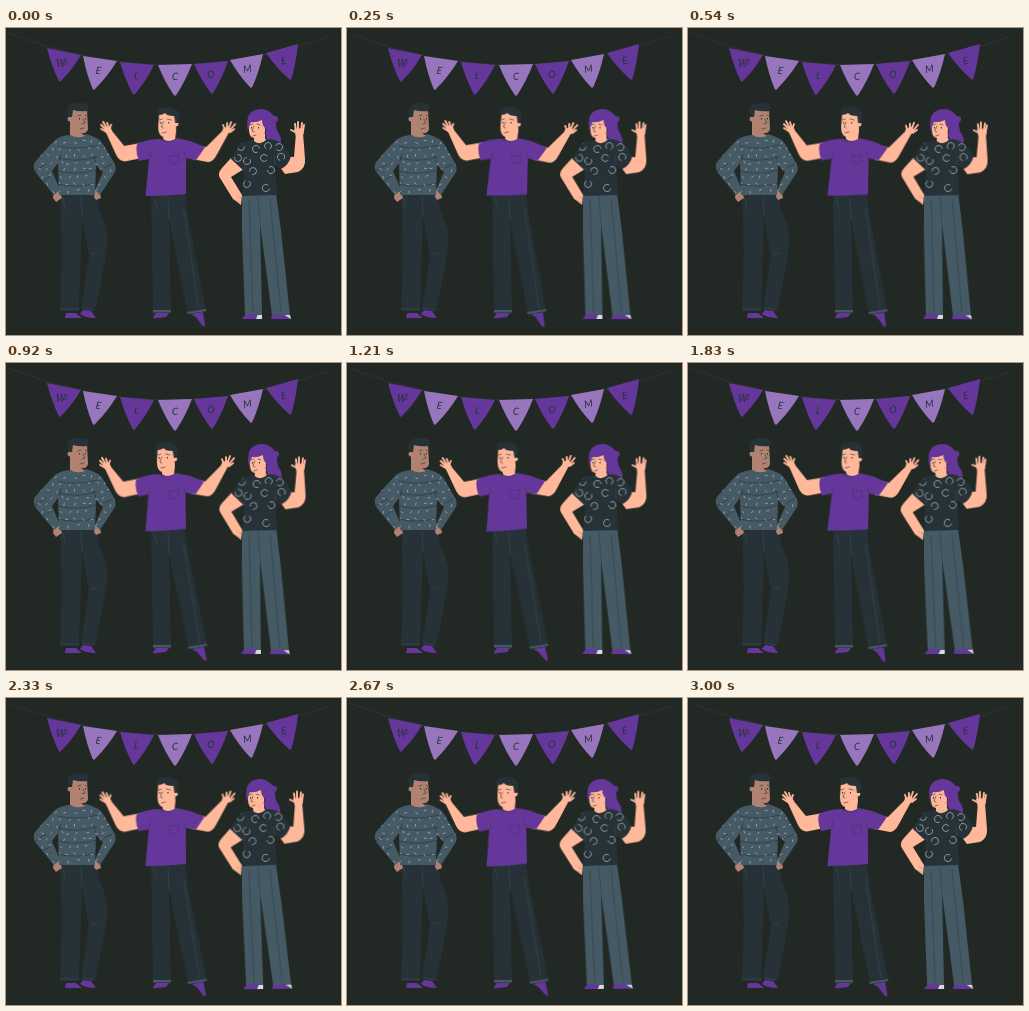
An HTML page for the animation above (3040 ms loop, 335x307 px).

```html
<!DOCTYPE html>
<html lang="en">
<head>
<meta charset="utf-8">
<title>Welcome</title>
<style>
html, body { margin: 0; width: 100%; height: 100%; overflow: hidden; background: #222823; }
svg { display: block; width: 100vw; height: 100vh; }
text { font-family: Lato, sans-serif; font-size: 10px; font-style: italic; fill: #263238; text-anchor: middle; }
.script { font-family: "Noto Serif", serif; font-size: 10px; }
.purple { fill: #66379b; }
.lilac { fill: #9876bd; }
.navy, .hair { fill: #263238; }
.slate { fill: #455a64; }
.brown { fill: #b18272; }
.skin { fill: #ffb899; }
.line { fill: none; stroke: #263238; stroke-width: .6; stroke-linecap: round; stroke-linejoin: round; }
.faint { stroke: #415158; stroke-width: .5; }
.white { fill: none; stroke: #b9c4c8; stroke-width: .65; stroke-linecap: round; }
.finger { fill: none; stroke: #ffb899; stroke-width: 1.9; stroke-linecap: round; }

/* Half a sine per pass; the man sways twice per loop, the woman once. */
.sway, .slow { animation: sway 760ms -410ms infinite alternate cubic-bezier(.37, 0, .63, 1); }
.slow { animation-duration: 1520ms; animation-delay: -760ms; }
@keyframes sway {
  from { transform: rotate(calc(var(--a) * -1)); }
  to { transform: rotate(var(--a)); }
}
#upper { --a: 1.3deg; transform-origin: 162px 168px; }
#armL { --a: -.5deg; transform-origin: 132px 123px; }
#armR { --a: -.5deg; transform-origin: 194px 125px; }
#leg { --a: .6deg; transform-origin: 172px 170px; }
#foot { --a: 2.5deg; transform-origin: 190px 285px; }
#woman { --a: .65deg; transform-origin: 254px 185px; }
</style>
</head>
<body>
<svg viewBox="0 0 335 307" preserveAspectRatio="none">
  <defs>
    <clipPath id="knit"><path d="M63 107Q54 108 49 112Q40 121 29 134Q26 139 30 145L48 167L54 162L46 143L52 135L53 167H89L90 137L97 144L89 162L94 167L109 144Q111 139 107 133L97 116Q94 110 80 106Q72 110 63 107Z"/></clipPath>
    <clipPath id="blouse"><path d="M248 112L237 114Q229 122 225 131L238 143L236 168L271 167L269 137L275 141Q283 137 285 128Q278 115 269 112L260 110Q253 117 248 112Z"/></clipPath>
  </defs>

  <path d="M2 5Q162 68 324 8" fill="none" stroke="#343d38" stroke-width=".6"/>
  <g id="flags"></g>

  <!-- man in the sweater -->
  <g>
    <path class="navy" d="M54 165H90L94 184Q104 204 101 221Q96 252 89 283L75 281L83 228L76 190L73 283H54Q57 220 54 165Z"/>
    <path class="line faint" d="M76 188L75 169M85 226L91 225M55 281H73M77 280L87 282M57 170L59 180"/>
    <path class="purple" d="M60 285H70L76 290H59ZM77 282L85 283L90 290Q79 290 74 286Z"/>
    <path class="brown" d="M48 163L54 164L56 170L50 174L47 170ZM89 162L94 165L95 170L90 172L88 169Z"/>
    <g clip-path="url(#knit)">
      <path class="slate" d="M20 100H120V175H20Z"/>
      <path class="line" d="M52 118Q70 123 92 117M52 130Q70 135 91 129M52 143Q70 148 91 142M52 156Q70 161 91 155M29 143L40 136M98 140L109 135M38 153L46 147M53 133L55 126M90 137L88 128"/>
      <path class="white" id="dashes"/>
    </g>
    <path class="brown" d="M64 81H81L82 101Q81 106 75 105L79 108Q71 111 64 107Z"/>
    <circle class="brown" cx="64" cy="91" r="2.5"/>
    <path class="hair" d="M63 89Q59 81 64 77Q72 73 81 76Q84 79 82 83Q73 84 67 82L66 89Z"/>
    <path class="line" d="M72 88L75 87M79 87L81 88M77 91L79 95L76 96M74 101L78 100"/>
    <path class="navy" d="M73 90h1v1.5h-1zM79 90h1v1.5h-1z"/>
  </g>

  <!-- man with open arms -->
  <g>
    <g id="leg" class="sway">
      <path class="navy" d="M161 165H179L182 190L200 282L182 285L163 191Z"/>
      <path class="line faint" d="M176 170L179 190L193 280M168 171L174 171"/>
      <path class="slate" d="M181 284L200 281L200.500 283L182 286Z"/>
      <path id="foot" class="sway purple" d="M185 286L197 284L199 295Q200 299 197 298L190 289Z"/>
    </g>
    <path class="navy" d="M145 165H179L178 180L163 191L165 284H147Z"/>
    <path class="line faint" d="M163 191L162 170M148 171L151 180"/>
    <path class="slate" d="M147 282H165V284.500H147Z"/>
    <path class="purple" d="M150 285H163L160 289L147 290.500Q147 288 150 285Z"/>
    <g id="upper" class="sway">
      <g id="armL" class="sway">
        <path class="skin" d="M100 105L105 102L118 118L135 115L136 130L119 133.500Q113 133 110 127Z"/>
        <path class="skin" d="M99 100L104 99L106 103L101 106L98 103Z"/>
        <path class="finger" d="M100 102L95 97M101 101L97 94M103 101L101 95M103 102L105 97M100 104L95 101"/>
      </g>
      <g id="armR" class="sway">
        <path class="skin" d="M186 117L200 119L217 102L223 104L211 126Q207 134 202 134L186 131Z"/>
        <path class="skin" d="M217 100L223 98L225 103L221 106L216 104Z"/>
        <path class="finger" d="M219 102L217 97M221 102L221 95M222 102L225 94M223 103L229 96M224 104L228 101"/>
      </g>
      <path class="purple" d="M154 111Q162 114 170 110L184 113L199 119Q195 125 190 132L180 130L180 166Q160 168 139.500 168L143 131L133 133Q129 124 131 116Q142 111 154 111Z"/>
      <path class="line" d="M164 128L173 127V134L170 136L165 135ZM180 130L178 123M144 131L145 123M154 112Q162 116 170 111" stroke-opacity=".6"/>
      <path class="skin" d="M153 85L169 84L170 103L169 111Q162 115 157 111V109Q152 107 152 99Z"/>
      <circle class="skin" cx="170" cy="96" r="2.4"/>
      <path class="hair" d="M153 87Q149 85 152 83Q151 79 157 80Q164 77 169 81Q175 84 172 95L169 95L168 88Q160 88 159 85Q156 87 153 87Z"/>
      <path class="line" d="M153 92L156 91M161 91L165 92M157 94L155 99L157 100M156 105L160 104"/>
      <path class="navy" d="M154 94h1v1.5h-1zM162 94h1v1.5h-1z"/>
    </g>
  </g>

  <!-- waving woman -->
  <g id="woman" class="slow">
    <path class="slate" d="M236 165H270L275 203L284 287H266L254 195L256 287H239L236 203Z"/>
    <path class="line" d="M254 195L252 169M243 172L247 285M264 171L275 284" stroke-opacity=".65"/>
    <path fill="#d8dce0" d="M249 287H256L256 291H247ZM275 287H284L285 291H275Z"/>
    <path class="purple" d="M240 286H252L250 291H236ZM266 287L277 286L285 291H265Z"/>
    <path class="skin" d="M225 130L238 141L225 149L236 167L235 177L227 171L214 150Q211 145 216 140Z"/>
    <path class="line" d="M228 172L235 175M231 169L236 171" stroke-opacity=".3"/>
    <path class="skin" d="M275 128L288 129L290 105L297 105L299 131Q300 140 292 144L279 146L273 138Z"/>
    <path class="skin" d="M288 101L297 100L298 105L296 109H290Z"/>
    <path class="finger" d="M289 104L285 102M290 103L289 96M292 103L292 94M295 103L296 95M297 103L298 97"/>
    <path class="purple" d="M261 92L270 92Q269 101 274 108Q277 115 272 118Q269 115 264 114Q259 108 261 92Z"/>
    <g clip-path="url(#blouse)">
      <path class="navy" d="M220 105H290V172H220Z"/>
      <g id="rings"></g>
    </g>
    <path class="line faint" d="M238 143L239 134M269 137L268 128"/>
    <path class="skin" d="M243 92L259 88V110L260 112Q254 118 248 113V110Q243 109 243 102Z"/>
    <path class="purple" d="M242 104Q239 87 247 83Q257 78 265 85L270 90L268 98L263 112Q258 110 260 101Q256 98 256 92Q250 95 245 94Q243 98 242 104Z"/>
    <ellipse class="purple" cx="269" cy="91" rx="3" ry="3"/>
    <path class="line" d="M244 97L247 96M251 96L254 97M248 98L246 103L248 104M247 108L250 107"/>
    <path class="navy" d="M245 99h1v1.500h-1zM252 99h1v1.500h-1z"/>
    <circle cx="259" cy="105" r=".7" fill="#66379b"/>
  </g>
</svg>
<script>
const get = id => document.getElementById(id);

// Letter, left top, right top, tip.
const flags = [
  ["W", 41, 20, 75, 27, 54, 54],
  ["E", 77, 28, 111, 33, 88, 62],
  ["L", 114, 34, 148, 37, 128, 67],
  ["C", 152, 37, 186, 36, 169, 68],
  ["O", 188, 36, 222, 33, 206, 66],
  ["M", 224, 32, 257, 26, 245, 60],
  ["E", 260, 25, 292, 16, 284, 52]
];
get("flags").innerHTML = flags.map(([letter, x1, y1, x2, y2, tx, ty], i) => {
  const angle = Math.atan2(y2 - y1, x2 - x1) * 180 / Math.PI;
  const x = (x1 + x2 + tx) / 3, y = (y1 + y2 + ty) / 3 + 5;
  const shape = `M${x1} ${y1}L${x2} ${y2}Q${(x2 + tx) / 2 + 2} ${(y2 + ty) / 2 + 1} ${tx + 1.5} ${ty - 1.5}` +
    `Q${tx} ${ty + 1} ${tx - 1.5} ${ty - 1.5}Q${(x1 + tx) / 2 - 2} ${(y1 + ty) / 2 + 1} ${x1} ${y1}Z`;
  const swash = i ? "" : '<path class="line" d="M58 33Q61 31 61 35Q59 38 57 35"/>';
  return `<path class="${i % 2 ? "lilac" : "purple"}" d="${shape}"/>` +
    `<text class="${i ? "" : "script"}" transform="translate(${i ? x : x - 2} ${y}) rotate(${i ? angle : 0})">${letter}</text>${swash}`;
}).join("");

let seed = 17;
const random = () => (seed = seed * 16807 % 2147483647) / 2147483647;
let dashes = "";
for (let y = 112; y < 166; y += 7) {
  for (let x = 31 + y % 2 * 4; x < 110; x += 9) {
    const angle = random() * Math.PI;
    const px = x + random() * 3, py = y + random() * 3;
    dashes += `M${px} ${py}l${2 * Math.cos(angle)} ${2 * Math.sin(angle)}`;
  }
}
get("dashes").setAttribute("d", dashes);

const rings = [
  [235, 119], [250, 121], [262, 118], [273, 119], [232, 130], [241, 133], [258, 130],
  [275, 129], [247, 143], [265, 142], [241, 156], [260, 160]
];
get("rings").innerHTML = rings.map(([x, y], i) =>
  `<circle class="white" cx="${x}" cy="${y}" r="3.5" stroke-dasharray="17 5" transform="rotate(${i * 67} ${x} ${y})"/>`
).join("");
</script>
</body>
</html>
```
